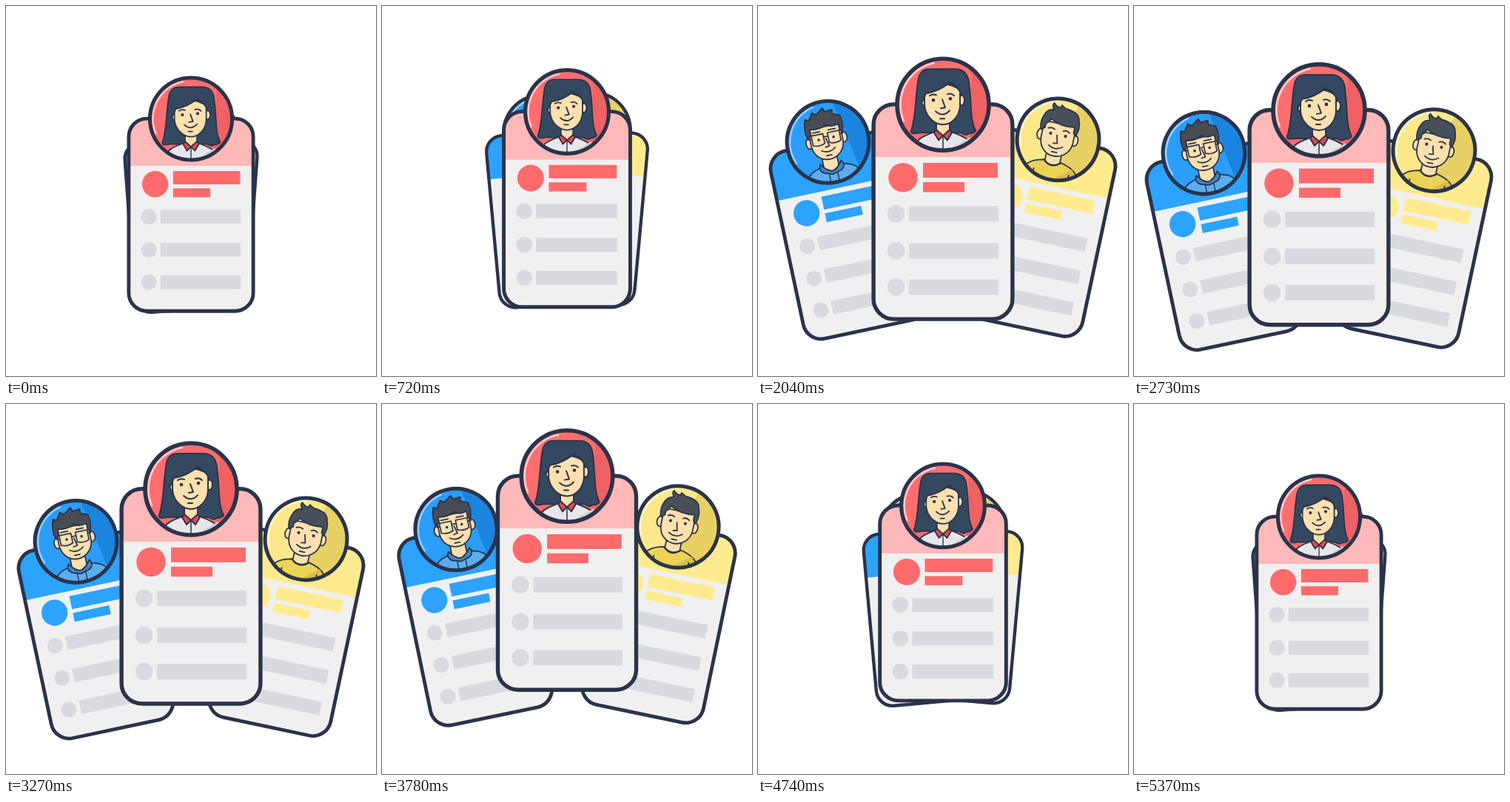
Write an HTML page with a canvas that moves like this. It is 500x500 px and loops after 5430 ms.

```html
<!DOCTYPE html>
<html lang="en">
<head>
<meta charset="utf-8">
<title>Profile cards</title>
<style>
html, body { margin: 0; width: 100%; height: 100%; overflow: hidden; background: #fff; }
canvas { display: block; width: 500px; height: 500px; }
</style>
</head>
<body>
<canvas id="stage" width="500" height="500"></canvas>
<script>
const ctx = document.getElementById('stage').getContext('2d');
const LOOP = 5430, STEP = 30;
const INK = '#2a334a', SKIN = '#ffe0ae', PAPER = '#f0f0f0', GREY = '#d9dae0';

// Smooth monotone curve through [time, value] pairs, flat at both ends.
function curve(keys) {
  const n = keys.length - 1;
  const slope = i => (keys[i + 1][1] - keys[i][1]) / (keys[i + 1][0] - keys[i][0]);
  const tangent = i => {
    if (i === 0 || i === n) return 0;
    const a = slope(i - 1), b = slope(i);
    return a * b <= 0 ? 0 : 2 * a * b / (a + b);
  };
  return t => {
    let i = 0;
    while (i < n - 1 && t > keys[i + 1][0]) i++;
    const [t0, v0] = keys[i], [t1, v1] = keys[i + 1];
    const h = t1 - t0, u = (t - t0) / h, w = 1 - u;
    return v0 * w * w * (1 + 2 * u) + v1 * u * u * (3 - 2 * u) +
      h * u * w * (tangent(i) * w - tangent(i + 1) * u);
  };
}

const spread = curve([[0, 0], [570, .085], [720, .134], [1140, .46], [1440, .815],
  [1710, .985], [1900, 1], [3480, 1], [3780, .96], [3990, .8], [4230, .5],
  [4560, .2], [5130, .02], [5370, 0], [5430, 0]]);
const frontY = curve([[0, 152.5], [570, 146.5], [720, 143], [1140, 132.5], [1440, 125.6],
  [1530, 125.2], [1710, 127.5], [2280, 137], [2700, 141], [3420, 108], [3780, 97.5],
  [3990, 101.5], [4230, 113], [4560, 129.5], [5130, 150.3], [5370, 152.5], [5430, 152.5]]);
const sideY = curve([[0, 181.5], [570, 176], [720, 170.5], [1250, 161.5], [1440, 163.5],
  [1710, 172], [2280, 191], [2760, 198.7], [3420, 181], [3780, 169.5], [3990, 164],
  [4230, 161], [5130, 180], [5370, 181.5], [5430, 181.5]]);

function shape(d, fill, line, width = 2) {
  const p = new Path2D(d);
  if (fill) { ctx.fillStyle = fill; ctx.fill(p); }
  if (line) { ctx.strokeStyle = line; ctx.lineWidth = width; ctx.stroke(p); }
}
function oval(x, y, rx, ry, fill, line, width = 2) {
  ctx.beginPath();
  ctx.ellipse(x, y, rx, ry, 0, 0, Math.PI * 2);
  if (fill) { ctx.fillStyle = fill; ctx.fill(); }
  if (line) { ctx.strokeStyle = line; ctx.lineWidth = width; ctx.stroke(); }
}
function box(x, y, w, h, fill) {
  ctx.fillStyle = fill;
  ctx.fillRect(x, y, w, h);
}
const dot = (x, y, r, fill) => oval(x, y, r, r, fill);

function woman() {
  const hair = '#34495f';
  shape('M-33-36Q-30-48-18-48H18Q33-47 35-30C39 0 36 20 44 35Q42 39 35 39Q31 43 24 38H-32Q-44 41-43 35C-36 15-38-10-33-36Z', hair, INK);
  shape('M-40 65C-39 47-28 43-12 37H12C28 43 39 47 42 65Z', '#e7e7ea', INK);
  shape('M8 61L36 44L46 65Z', '#cfd0d4');
  shape('M-9 20V36L0 43L9 36V20Z', SKIN, INK);
  shape('M-9 34L0 42L-6 48L-12 38ZM9 34L0 42L6 48L12 38Z', '#e5484d', INK);
  shape('M0 43V62', null, INK, 1.5);
  oval(-25, -5, 4, 7, SKIN, INK);
  oval(25, -6, 4, 7, SKIN, INK);
  shape('M-25-18V2C-23 18-10 27 0 27S22 18 23 2V-20Q0-36-25-18Z', SKIN, INK);
  shape('M-32-8V-36Q-30-47-18-47H18Q33-46 34-16L25-12Q22-24 9-30Q-5-18-23-15L-28-4Z', hair);
  shape('M25-12Q22-24 9-30Q-5-18-23-15L-28-4', null, INK);
  shape('M-18-12Q-14-15-9-13M6-14Q11-16 15-12M-1-7L3 4L-3 5M-10 9Q0 18 9 8M-4 19H2', null, INK);
  dot(-13, -6, 2.3, INK);
  dot(10, -8, 2.3, INK);
}

function man(hair, tuft, skew) {
  oval(-28, -3, 5, 8, SKIN, INK);
  oval(25, -3, 5, 8, SKIN, INK);
  shape('M-26-24V2C-25 17-14 26-2 26S22 17 23 2V-24Z', SKIN, INK);
  shape(tuft, hair, INK);
  shape(`M${-2 + skew}-6L${1 + skew} 6L${-5 + skew} 7M-12 11Q-1 18 9 10M-6 20H2`, null, INK);
}

function blueMan() {
  shape('M-46 66C-44 45-34 39-17 36H13C30 39 42 45 44 66Z', '#5aaef0', INK);
  shape('M-14 22V38L-2 45L9 38V22Z', SKIN, INK);
  shape('M-18 31Q-24 39-15 45L-2 49L12 45Q20 39 14 31Q6 43-2 44Q-10 43-18 31Z', '#3b87c8', INK);
  shape('M-8 48V59M5 48V59', null, INK, 1.6);
  man('#474c53', 'M-29-11Q-33-25-27-40L-22-37L-15-48L-9-44L2-52L5-46L16-47L15-41L26-36Q29-25 25-11L21-15V-24Q9-20 3-27Q-9-20-23-24V-15Z', 0);
  shape('M-23-14H-5V1Q-14 5-23 1ZM2-14H20V1Q11 5 2 1ZM-5-8Q-2-10 2-8M-23-9H-28M20-9H25', null, INK, 1.9);
  shape('M-20-18H-9M4-18H15', null, INK);
  dot(-13, -6, 2, INK);
  dot(10, -6, 2, INK);
}

function yellowMan() {
  shape('M-46 66C-44 45-34 38-15 34H12C30 38 42 45 44 66Z', '#ebd354', INK);
  shape('M2 62L30 40L46 66Z', '#d9bd4b');
  shape('M-13 22V35Q-2 44 10 35V22Z', SKIN, INK);
  shape('M-15 34Q-2 47 12 34M-27 50V62M27 50V62', null, INK);
  man('#475059', 'M-29-10Q-33-23-27-35Q-24-42-15-43Q-20-49-17-53Q-11-47-6-48L-5-52L2-48Q23-47 25-35Q30-23 25-10L21-14V-23Q0-19-17-29Q-18-23-23-20V-14Z', -1);
  shape('M-18-14Q-13-17-8-14M5-14Q10-17 15-13', null, INK);
  dot(-13, -7, 2.3, INK);
  dot(10, -7, 2.3, INK);
}

const RED = { main: '#ff6b6d', head: '#ffb9b9', back: '#ff6e6e', dark: '#ef6163', glow: '#ffd0d0',
  wedge: 'M40-65L65-65V65H34Z', face: woman };
const BLUE = { main: '#2ca3ff', head: '#2ca3ff', back: '#2b9dfa', dark: '#1b84de', glow: '#9fd2ff',
  wedge: 'M18-65H65V65H42Z', face: blueMan };
const YELLOW = { main: '#ffeb8f', head: '#ffeb8f', back: '#fde98b', dark: '#e9d065', glow: '#fff7cf',
  wedge: 'M24-65H65V65H-28Z', face: yellowMan };

function cardPath(inset) {
  ctx.beginPath();
  ctx.roundRect(-96.5 + inset, -3 + inset, 193 - 2 * inset, 295.5 - 2 * inset, 30 - inset);
}

// Local origin is the centre of the portrait.
function card(look, x, y, scale, angle) {
  ctx.save();
  ctx.translate(x, y);
  ctx.rotate(angle * Math.PI / 180);
  ctx.scale(scale, scale);
  ctx.lineCap = ctx.lineJoin = 'round';

  ctx.save();
  cardPath(2.5);
  ctx.fillStyle = PAPER;
  ctx.fill();
  ctx.clip();
  box(-97, -4, 194, 75, look.head);
  ctx.restore();
  cardPath(2.6);
  ctx.strokeStyle = INK;
  ctx.lineWidth = 5.4;
  ctx.stroke();

  dot(-54, 98.5, 19.8, look.main);
  box(-27, 78.8, 101, 20, look.main);
  box(-27, 104.7, 56, 13.6, look.main);
  for (const row of [147.5, 197.5, 246.5]) {
    dot(-63.5, row, 11.8, GREY);
    box(-46, row - 10.4, 121, 20.8, GREY);
  }

  ctx.save();
  ctx.beginPath();
  ctx.arc(0, 0, 62, 0, Math.PI * 2);
  ctx.clip();
  box(-65, -65, 130, 130, look.back);
  shape(look.wedge, look.dark);
  ctx.beginPath();
  ctx.arc(0, 0, 57.5, 2.75, 4.5);
  ctx.strokeStyle = look.glow;
  ctx.lineWidth = 2.6;
  ctx.stroke();
  look.face();
  ctx.restore();
  oval(0, 0, 62, 62, null, INK, 5.6);
  ctx.restore();
}

function draw(t) {
  ctx.fillStyle = '#fff';
  ctx.fillRect(0, 0, 500, 500);
  const p = spread(t), dx = 17 + 138.5 * p, y = sideY(t);
  const size = .79 + .103 * p, tilt = 4.2 + 7.8 * p;
  card(YELLOW, 250 + dx, y - 3.5, size, tilt);
  card(BLUE, 250 - dx, y, size, -tilt);
  card(RED, 250, frontY(t), .896 + .104 * p, 0);
}

const start = performance.now();
function tick() {
  const t = (performance.now() - start) % LOOP;
  draw(Math.floor(t / STEP) * STEP);
  requestAnimationFrame(tick);
}
tick();
</script>
</body>
</html>
```
